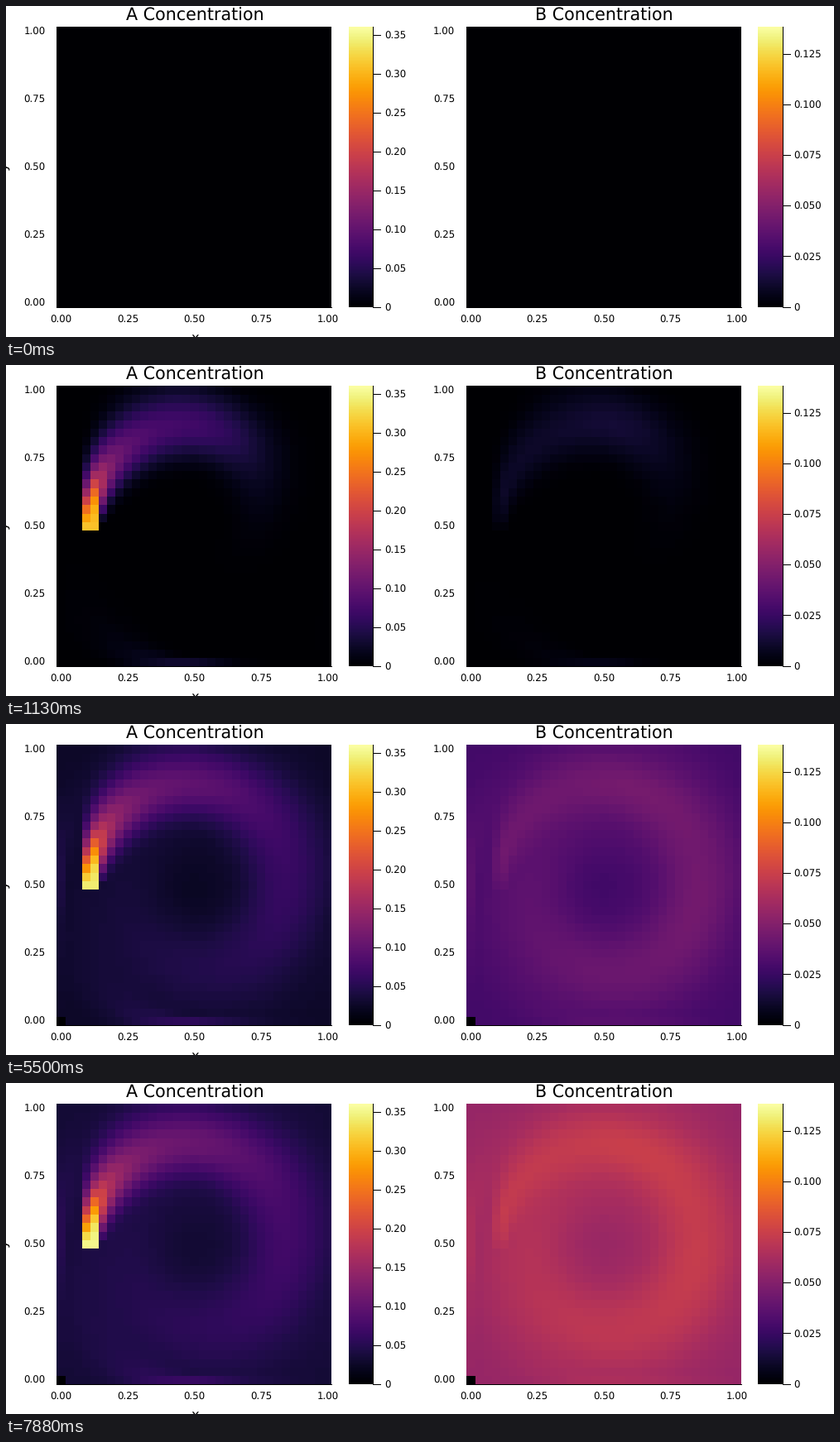
Write a matplotlib script that moves like this. It is 1000 px wide and 400 px high and loops after 8 s.

```python
import math
import numpy as np
import matplotlib.pyplot as plt
from matplotlib.animation import FuncAnimation
from matplotlib.patches import Rectangle

W, H, DPI = 1000, 400, 100
FRAMES, INTERVAL = 64, 125

# Transport model on a periodic grid
N = 32
FRAME_DT, SUBSTEPS = 0.1, 10
EMISSION, RATE = 10.0, 0.27

nodes = np.arange(1, N + 1) / N
X, Y = np.meshgrid(nodes, nodes)
theta = np.arctan2(Y - 0.5, X - 0.5)
U, V = np.sin(theta), -np.cos(theta)
source = EMISSION * ((abs(X - 0.1) < 1 / N) & (abs(Y - 0.5) < 0.5 / N))


def upwind(c, vel, axis):
    back = c - np.roll(c, 1, axis)
    ahead = np.roll(c, -1, axis) - c
    return vel * np.where(vel > 0, back, ahead) * N


def slope(state):
    a, b = state
    moved = [-upwind(c, U, 1) - upwind(c, V, 0) for c in (a, b)]
    return np.array([moved[0] + source - RATE * a, moved[1] + RATE * a])


def advance(s, h):
    k1 = slope(s)
    k2 = slope(s + h / 2 * k1)
    k3 = slope(s + h / 2 * k2)
    k4 = slope(s + h * k3)
    return s + h / 6 * (k1 + 2 * k2 + 2 * k3 + k4)


def wrap(c):
    """Add the periodic edge nodes; the shared corner stays empty."""
    full = np.pad(c, ((1, 0), (1, 0)), mode="wrap")
    full[0, 0] = 0
    return full


def simulate():
    state = np.zeros((2, N, N))
    history = []
    for _ in range(FRAMES):
        history.append([wrap(c) for c in state])
        for _ in range(SUBSTEPS):
            state = advance(state, FRAME_DT / SUBSTEPS)
    return history


history = simulate()

# Stage measured in pixels, y pointing down
plt.rcParams["font.family"] = "DejaVu Sans"
plt.rcParams["text.hinting"] = "none"
fig = plt.figure(figsize=(W / DPI, H / DPI), dpi=DPI, facecolor="white")
ax = fig.add_axes([0, 0, 1, 1])
ax.axis("off")

TOP, BOTTOM = 25, 364
WIDTH, HEIGHT = 332, BOTTOM - TOP
TITLE, GUIDE, TICK = 20.7, 16.3, 11.8


def text(x, y, s, px, ha="center", **kw):
    ax.text(x, y, s, fontsize=px * 72 / DPI, ha=ha, va="baseline", **kw)


def bar(x, y, w, h):
    ax.add_patch(Rectangle((x, y), w, h, color="black", lw=0))


def image(data, left, right, vmax):
    return ax.imshow(data, cmap="inferno", vmin=0, vmax=vmax,
                     extent=(left, right, BOTTOM, TOP), aspect="auto",
                     interpolation="nearest")


def to_pixels(c):
    """Blow the node grid up to one value per screen pixel."""
    rows = np.arange(HEIGHT) * (N + 1) // HEIGHT
    cols = np.arange(WIDTH) * (N + 1) // WIDTH
    return c[::-1][rows][:, cols]


def panel(left, title, vmax, step, fmt):
    x0 = int(left)
    heat = image(to_pixels(history[0][0]), x0, x0 + WIDTH, vmax)
    bar(x0, BOTTOM, WIDTH + 1, 1)
    text(left + WIDTH / 2 + 0.8, 18, title, TITLE)

    cell_w, cell_h = WIDTH / (N + 1), HEIGHT / (N + 1)
    for v in np.linspace(0, 1, 5):
        label = f"{v:.2f}"
        text(left + cell_w * (0.5 + N * v), 383.2, label, TICK)
        text(left - 13.7, BOTTOM - cell_h * (0.5 + N * v) + 4.4, label, TICK,
             ha="right")

    edge = int(left + 382)
    image(np.linspace(vmax, 0, 256)[:, None], math.ceil(left + 352), edge, vmax)
    bar(edge, TOP, 1, HEIGHT)
    for n in range(int(vmax / step) + 1):
        y = BOTTOM - HEIGHT * n * step / vmax
        bar(edge, int(y), 10, 1)
        text(left + 395.7, y + 4.4, format(n * step, fmt) if n else "0", TICK,
             ha="left")
    return heat


heats = [panel(61.5, "A Concentration", 0.361, 0.05, ".2f"),
         panel(556, "B Concentration", 0.1388, 0.025, ".3f")]
text(228, 406, "x", GUIDE)
text(2.6, 194.5, "y", GUIDE, rotation=90, rotation_mode="anchor")

ax.set_xlim(0, W)
ax.set_ylim(H, 0)


def update(i):
    for heat, data in zip(heats, history[i]):
        heat.set_data(to_pixels(data))
    return heats


anim = FuncAnimation(fig, update, frames=FRAMES, interval=INTERVAL,
                     repeat=True, repeat_delay=0)
plt.show()
```
